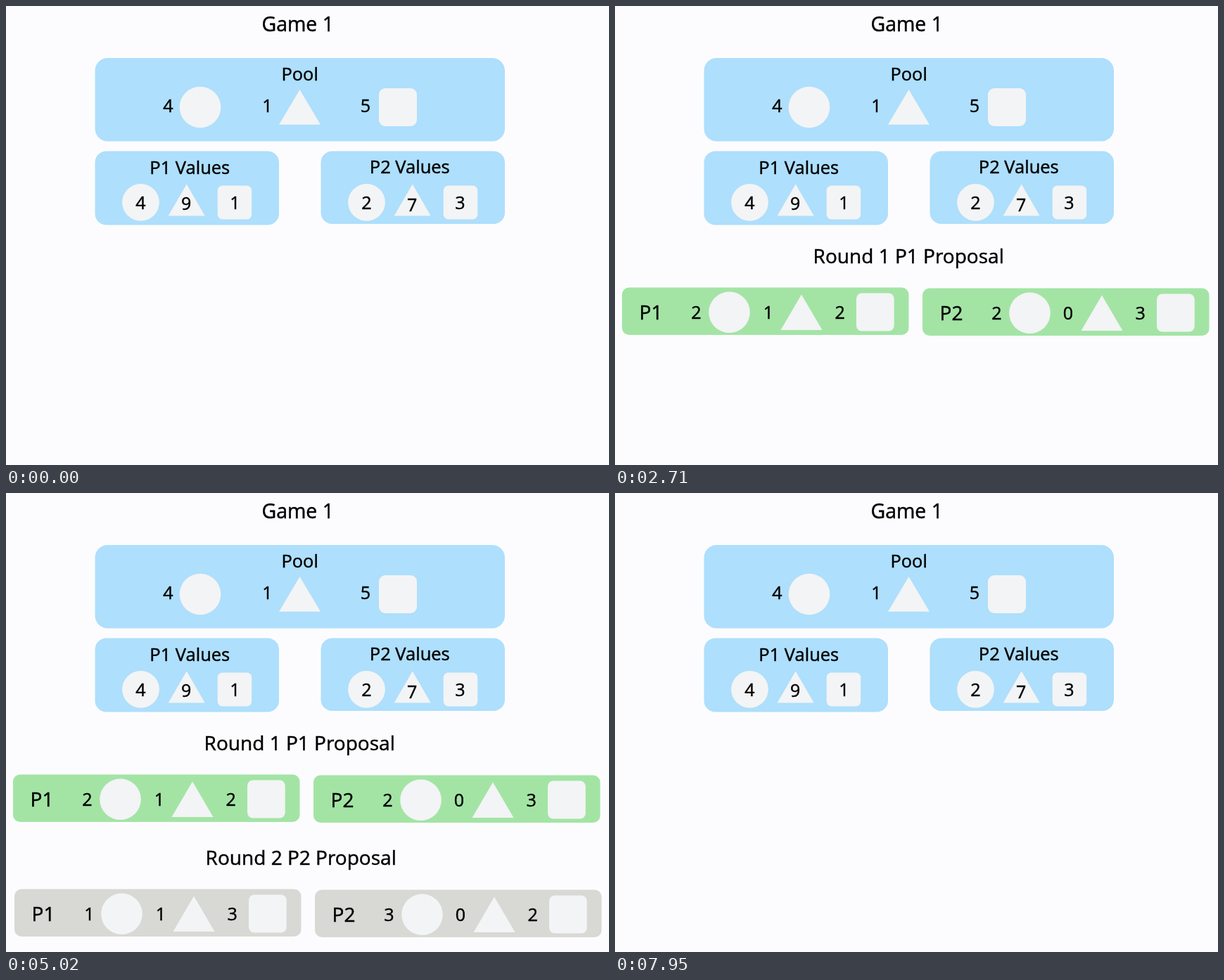
An HTML page that plays this animation: 857 px wide and 653 px high, repeating every 7990 ms.

```html
<!DOCTYPE html>
<html lang="en">
<head>
<meta charset="utf-8">
<title>Game rounds</title>
<style>
  html, body { margin: 0; width: 100%; height: 100%; overflow: hidden; background: #fcfcfe; }
  svg { display: block; width: 100%; height: 100%; }
  text { font-family: "Open Sans", "Noto Sans", sans-serif; fill: #000; stroke: #000; stroke-width: .45; text-anchor: middle; }
</style>
</head>
<body>
<svg id="stage" viewBox="0 0 857 653"></svg>
<script>
const LOOP = 7990, ROUND1 = 2000, ROUND2 = 4000, CLEAR = 6030;
const BLUE = '#aedffc', GREEN = '#a3e4a5', GREY = '#d8d8d5', PALE = '#f3f4f5';

const stage = document.getElementById('stage');

const text = (x, y, size, s) => `<text x="${x}" y="${y}" font-size="${size}">${s}</text>`;
const rect = (x, y, w, h, r, fill = PALE) =>
  `<rect x="${x}" y="${y}" width="${w}" height="${h}" rx="${r}" fill="${fill}"/>`;
const circle = (x, y, r) => `<circle cx="${x}" cy="${y}" r="${r}" fill="${PALE}"/>`;
const triangle = (x, y, w, h) =>
  `<path d="M${x} ${y}l${w / 2} ${h}h${-w}z" fill="${PALE}"/>`;
const group = (x, y, body, id = '') =>
  `<g${id && ` id="${id}"`} transform="translate(${x} ${y})">${body}</g>`;

// The digit 1 sits left of its advance centre
const digit = (x, y, n) => text(n === 1 ? x + 1 : x, y, 25, n);

function pool() {
  return rect(126.5, 74, 582.5, 118.5, 18, BLUE) + text(417.7, 105.5, 25.3, 'Pool') +
    digit(230.5, 151, 4) + circle(276, 144, 29.3) +
    digit(370.3, 151, 1) + triangle(417.5, 119, 59, 49.7) +
    digit(511, 151, 5) + rect(530, 117, 54, 54, 9);
}

function values(name, x, height, titleX, titleY, [a, b, c], bY) {
  return group(x, 0,
    rect(126.5, 206.5, 261.5, height, 16, BLUE) + text(titleX, titleY, 25.5, name + ' Values') +
    circle(191.5, 279.3, 26.4) + triangle(256.7, 253.5, 52, 45) + rect(300.7, 255.5, 48.5, 48, 7) +
    digit(191.3, 289, a) + digit(256.2, bY, b) + digit(324.5, 289, c));
}

function share(name, x, y, fill, [a, b, c]) {
  return group(x, y,
    rect(10, 400.5, 407.5, 67.5, 10, fill) + text(51, 445.5, 28, name) +
    digit(115.3, 445, a) + circle(162.5, 435.7, 29.3) +
    digit(217, 445, b) + triangle(265, 410.5, 59, 50.5) +
    digit(319.7, 445, c) + rect(343, 408.5, 53.7, 54, 8));
}

function round(id, x, y, title, fill, p1, p2) {
  return group(x, y,
    text(417.2, 365.5, 28, title) + share('P1', 0, 0, fill, p1) + share('P2', 427, 1, fill, p2), id);
}

stage.innerHTML =
  text(414.7, 35.5, 28.4, 'Game 1') + pool() +
  values('P1', 0, 105, 261.3, 239, [4, 9, 1], 290) +
  values('P2', 321, 103.5, 252.8, 237.5, [2, 7, 3], 291.5) +
  round('round1', 0, 0, 'Round 1 P1 Proposal', GREEN, [2, 1, 2], [2, 0, 3]) +
  round('round2', 2, 163, 'Round 2 P2 Proposal', GREY, [1, 1, 3], [3, 0, 2]);

const round1 = document.getElementById('round1');
const round2 = document.getElementById('round2');
const show = (el, on) => el.setAttribute('visibility', on ? 'visible' : 'hidden');

function draw(t) {
  show(round1, t >= ROUND1 && t < CLEAR);
  show(round2, t >= ROUND2 && t < CLEAR);
}

const start = performance.now();
function tick() {
  draw((performance.now() - start) % LOOP);
  requestAnimationFrame(tick);
}
tick();
</script>
</body>
</html>
```
